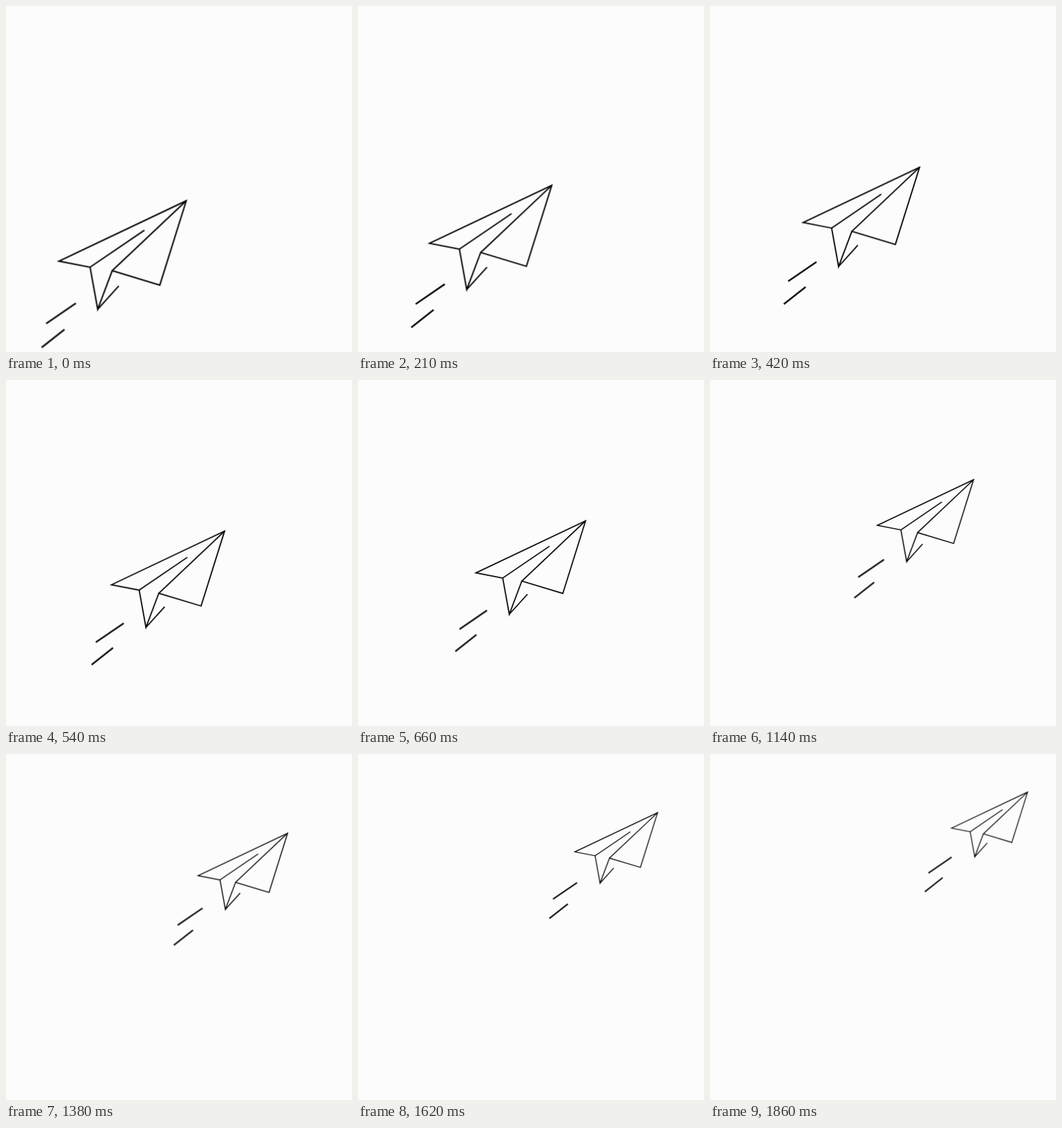
An HTML page for the animation above (1.89 s loop, 500 by 500 pixels).

```html
<!DOCTYPE html>
<html lang="en">
<head>
<meta charset="utf-8">
<title>Paper plane</title>
<style>
  html, body {
    margin: 0;
    width: 100%;
    height: 100%;
    overflow: hidden;
    background: #fcfcfc;
  }
  svg {
    display: block;
    width: 100%;
    height: 100%;
  }
  path { fill: none; stroke-miterlimit: 4; }
  .plane, .trail {
    transform-origin: 0 0;
    animation: 1890ms infinite;
  }
  .plane { stroke: #000; stroke-width: 2; animation-name: fly; }
  .trail { stroke: #111; stroke-width: 2.6; animation-name: follow; }

  /* A short hold, then 62 equal steps of 30 ms */
  @keyframes fly {
    0% { transform: translate(260.5px, 281.4px) scale(1); }
    1.587% {
      transform: translate(260.5px, 281.4px) scale(1);
      animation-timing-function: steps(62, jump-none);
    }
    100% { transform: translate(458.9px, 55px) scale(.597); }
  }
  @keyframes follow {
    0% { transform: translate(51.5px, 493.5px) scale(1); }
    1.587% {
      transform: translate(51.5px, 493.5px) scale(1);
      animation-timing-function: steps(62, jump-none);
    }
    100% { transform: translate(310.5px, 199px) scale(.78); }
  }
</style>
</head>
<body>
<svg viewBox="0 0 500 500">
  <g class="plane">
    <path d="M0 0L-184 87.3L-139 96L-128 156.8L-107 101.1L-38.2 121.9Z"/>
    <path d="M0 0L-107 101.1M-139 96L-60.5 42.6M-128 156.8L-97.5 123.1"/>
  </g>
  <g class="trail">
    <path d="M0 0L33 -26M6.5 -34.5L49.5 -64"/>
  </g>
</svg>
</body>
</html>
```
